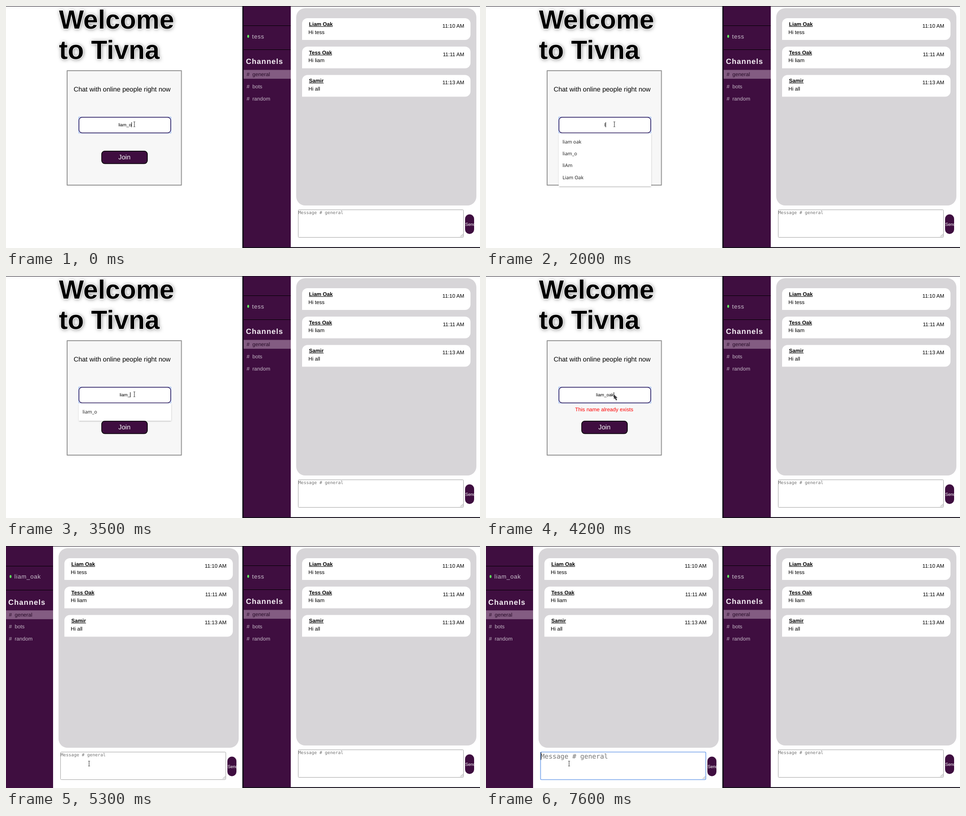
Animation of 1047 by 535 pixels, one loop 8 s. Source, as an HTML page with a canvas:

```html
<!DOCTYPE html>
<html lang="en">
<head>
<meta charset="utf-8">
<title>Chat sign-in</title>
<style>
html, body { margin: 0; width: 100%; height: 100%; overflow: hidden; background: #fff; }
canvas { display: block; width: 1047px; height: 535px; }
</style>
</head>
<body>
<canvas id="stage" width="1047" height="535"></canvas>
<script>
const ctx = document.getElementById('stage').getContext('2d');
const LOOP = 8000;
const SANS = '"Liberation Sans", Arial, sans-serif';
const MONO = '"DejaVu Sans Mono", monospace';
const NOTO = '"Noto Sans", sans-serif';
const PURPLE = '#3f0e40';
const CHAR = 8.77; // advance of one character in the focused message box

const messages = [
  ['Liam Oak', 'Hi tess', '11:10 AM'],
  ['Tess Oak', 'Hi liam', '11:11 AM'],
  ['Samir', 'Hi all', '11:13 AM']
];
const suggestions = ['liam oak', 'liam_o', 'liAm', 'Liam Oak'];

// Each step: start time, text, caret shown, number of suggestions, error shown
const nameSteps = [
  [0, 'liam_o', true, 0, false],
  [300, '', true, 0, true],
  [1000, '', false, 0, true],
  [1600, '', true, 0, true],
  [2000, 'l', true, 4, true],
  [2200, 'li', true, 4, true],
  [2500, 'lia', true, 4, true],
  [2900, 'liam', true, 4, true],
  [3200, 'liam', false, 4, true],
  [3500, 'liam_', true, 1, true],
  [3800, 'liam_o', true, 0, true],
  [3900, 'liam_oa', true, 0, true],
  [4000, 'liam_oak', true, 0, true]
];
// Each step: start time, text, caret shown
const messageSteps = [
  [5400, '', true],
  [5900, '', false],
  [6000, 'H', true],
  [6200, 'Hey', true],
  [6400, 'Hey a', true],
  [6500, 'Hey al', true],
  [6800, 'Hey all', true],
  [7100, 'Hey all!', true],
  [7600, '', true]
];

const stepAt = (steps, t) => steps.filter(s => s[0] <= t).pop();

function text(str, x, y, size, color, opt = {}) {
  ctx.font = `${opt.bold ? 'bold ' : ''}${size}px ${opt.family || SANS}`;
  ctx.textAlign = opt.align || 'left';
  ctx.letterSpacing = `${opt.spacing || 0}px`;
  ctx.fillStyle = color;
  ctx.fillText(str, x, y);
  return ctx.measureText(str).width;
}

function rect(x, y, w, h, color) {
  ctx.fillStyle = color;
  ctx.fillRect(x, y, w, h);
}

function round(x, y, w, h, r, fill, stroke, line = 1) {
  ctx.beginPath();
  ctx.roundRect(x, y, w, h, r);
  if (fill) {
    ctx.fillStyle = fill;
    ctx.fill();
  }
  if (stroke) {
    ctx.strokeStyle = stroke;
    ctx.lineWidth = line;
    ctx.stroke();
  }
}

function shadow(color, blur, x = 0, y = 0) {
  ctx.shadowColor = color;
  ctx.shadowBlur = blur;
  ctx.shadowOffsetX = x;
  ctx.shadowOffsetY = y;
}

function drawBeam(x, y) {
  rect(x - 0.5, y - 5.5, 1, 11, '#333');
  rect(x - 2, y - 6, 4, 1, '#555');
  rect(x - 2, y + 5, 4, 1, '#555');
}

function drawArrow(x, y) {
  ctx.beginPath();
  [[0, 0], [0, 10], [2.4, 8.4], [4.6, 13], [7, 12], [5, 7.6], [8, 7.2]]
    .forEach(([dx, dy]) => ctx.lineTo(x + dx, y + dy));
  ctx.closePath();
  ctx.fillStyle = '#3c3c3f';
  ctx.fill();
}

function drawTitle() {
  [['Welcome', 49.5], ['to Tivna', 116.5]].forEach(([line, y]) => {
    shadow('rgba(0,0,0,0.55)', 8, 1, 1);
    text(line, 117, y, 58.2, '#000', { bold: true });
    shadow('transparent', 0);
    ctx.strokeStyle = '#fff';
    ctx.lineWidth = 2.5;
    ctx.lineJoin = 'round';
    ctx.strokeText(line, 117, y);
    text(line, 117, y, 58.2, '#000', { bold: true });
  });
}

function drawSuggestions(count) {
  shadow('rgba(0,0,0,0.4)', 3, 0, 1);
  rect(160.5, 281.5, 204.5, 12.4 + count * 26.2, '#fff');
  shadow('transparent', 0);
  const list = count === 1 ? [suggestions[1]] : suggestions;
  list.forEach((s, i) => text(s, 169, 304 + i * 26.2, 10.5, '#222', { family: NOTO }));
}

function drawLogin(t) {
  const [, name, caret, count, error] = stepAt(nameSteps, t);
  drawTitle();
  round(135, 143, 252.5, 253, 0, '#f7f7f7', '#969696', 2);
  text('Chat with online people right now', 256.5, 189, 14.54, '#000', { align: 'center' });
  if (error) text('This name already exists', 261, 299, 11.63, '#f00', { align: 'center' });

  round(160.5, 245.5, 204, 35.5, 0, '#e9effb', '#8fb4f2');
  round(161.2, 246, 202.6, 34.5, 7, '#fff', '#2c195a', 1.5);
  const width = text(name, 262.5, 266, 9.7, '#000', { align: 'center' });
  if (caret) rect(Math.round(262.5 + width / 2), 257, 1, 11, '#000');

  round(211.3, 320.7, 101, 27.8, 7, PURPLE, '#000', 1.5);
  text('Join', 261.7, 339, 14.54, '#fff', { align: 'center' });
  if (count) drawSuggestions(count);
  if (t < 4200) drawBeam(283.5, 261.5);
  else drawArrow(282.5, 262);
}

function drawSidebar(x, user, dy) {
  rect(x, 1, 104, 534, PURPLE);
  rect(x, 43 + dy, 104, 1, '#000');
  rect(x, 96 + dy, 104, 1, '#000');
  round(x + 8, 63.7 + dy / 2, 4, 6.6, 2, '#5cf05c');
  text(user, x + 18.6, 71.5 + dy * 0.8, 13.1, '#cbc2ce', { spacing: 0.75 });
  text('Channels', x + 5, 128 + dy * 1.5, 16.4, '#f5eff5', { bold: true, spacing: 1.1 });
  rect(x, 141.3 + dy, 104, 19.5, '#835c82');
  ['general', 'bots', 'random'].forEach((name, i) => {
    const y = 154.6 + i * 27 + dy * (i ? 0.7 : 1.2);
    const color = i ? '#c3b5c4' : '#260a27';
    text('#', x + 6.5, y, 11.63, color);
    text(name, x + 19.2, y, 11.63, color);
  });
}

function drawMessages(x, bottom) {
  round(x + 116, 5, 398, bottom - 5, 20, '#d7d5d8');
  messages.forEach(([who, body, time], i) => {
    const y = 27 + i * 62.7;
    round(x + 129, y, 372, 48, [12, 12, 12, 0], '#fff');
    const width = text(who, x + 144.3, y + 17, 11.63, '#000', { bold: true });
    rect(x + 144.3, Math.round(y + 18), width, 1, '#000');
    text(body, x + 143, y + 34.5, 11.63, '#000');
    text(time, x + 487.3, y + 21, 11.63, '#000', { align: 'right' });
  });
}

function drawComposer(x, y, step) {
  round(x + 120.5, y + 0.5, 365, 61, 2, '#fff', step ? '#76a3ea' : '#a3a3a3', step ? 1.6 : 1);
  ctx.strokeStyle = '#777';
  ctx.lineWidth = 0.8;
  ctx.beginPath();
  [6, 3].forEach(d => {
    ctx.moveTo(x + 484.5 - d, y + 60);
    ctx.lineTo(x + 484.5, y + 60 - d);
  });
  ctx.stroke();

  const body = step ? step[1] : '';
  const size = step ? 14.54 : 9.73;
  text(body || 'Message # general', x + 120.7, y + (step ? 14.8 : 9.8), size,
    body ? '#000' : '#757575', { family: MONO });
  if (step && step[2]) rect(Math.round(x + 121 + body.length * CHAR), y + 1, 1, 17, '#000');

  round(x + 489, y + 10.5, 20, 43.5, 10, PURPLE);
  ctx.save();
  ctx.clip();
  text('Send', x + 489.5, y + 35.7, 9.7, '#fff');
  ctx.restore();
}

function drawPointer(t) {
  if (t < 4900) return drawBeam(283.5, 261.5);
  const p = Math.min(1, (Math.floor((t - 4900) / 100) + 1) / 5);
  const e = p * p * (3 - 2 * p);
  const x = 283.5 - 100 * e;
  const y = 261.5 + 219.5 * e;
  (y > 456 ? drawBeam : drawArrow)(x, y);
}

function drawChat(x, user, dy, bottom, step) {
  rect(x, 1, 522, 534, '#fff');
  drawSidebar(x, user, dy);
  drawMessages(x, bottom);
  drawComposer(x, bottom + 9, step);
}

function draw(t) {
  rect(0, 0, 1047, 535, '#fff');
  drawChat(525, 'tess', 0, 441, null);
  if (t < 4300) {
    drawLogin(t);
  } else {
    drawChat(0, 'liam_oak', 1, 446, stepAt(messageSteps, t));
    drawPointer(t);
  }
  rect(522, 0, 3, 535, '#17121d');
  rect(525, 533, 522, 2, '#17121d');
  rect(0, 0, 1047, 1, '#17121d');
}

ctx.textRendering = 'geometricPrecision';
const start = performance.now();
function tick() {
  draw((performance.now() - start) % LOOP);
  requestAnimationFrame(tick);
}
tick();
</script>
</body>
</html>
```
